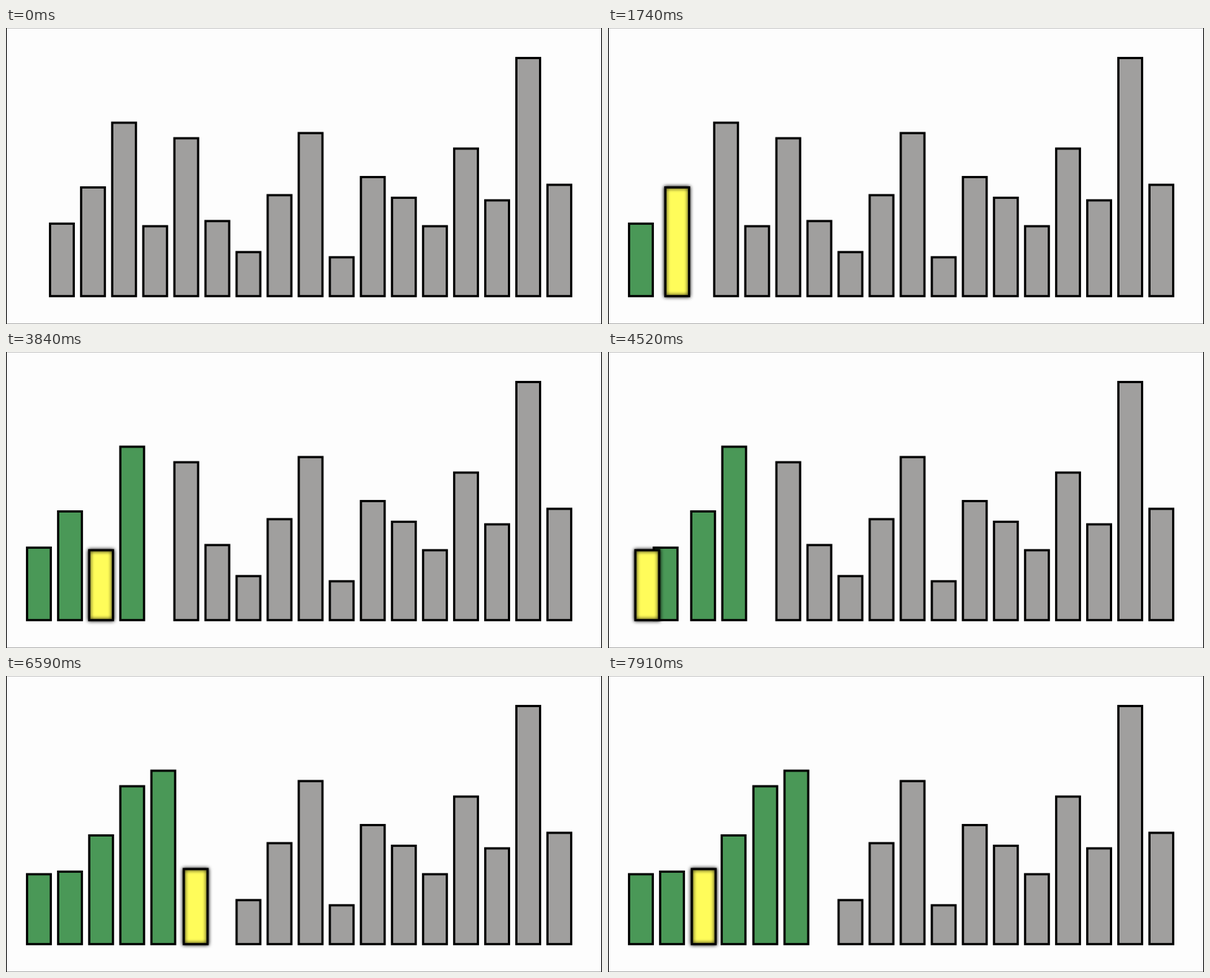
An HTML page with a canvas for the animation above (8000 ms loop, 804 by 400 pixels).

```html
<!DOCTYPE html>
<html lang="en">
<head>
<meta charset="utf-8">
<title>Insertion sort</title>
<style>
  html, body { margin: 0; width: 100%; height: 100%; overflow: hidden; }
  canvas { display: block; }
</style>
</head>
<body>
<canvas id="stage" width="804" height="400"></canvas>
<script>
const ctx = document.getElementById('stage').getContext('2d');
const LOOP = 8000, DECAY = 95;
const PITCH = 41.94, BAR = 32, LINE = 3, BASE = 362.3, SCALE = 3.497;
const UNSORTED = 59.4, SORTED = 28.4;
const GREY = '#a09f9e', GREEN = '#4a9857', YELLOW = '#fffc5a', PAPER = '#fdfdfd';

const values = [28, 42, 67, 27, 61, 29, 17, 39, 63, 15, 46, 38, 27, 57, 37, 92, 43];

// Per picked bar: when it lights up, then when each of its slides starts.
const turns = [
  { lit: 830, slides: [1030] },
  { lit: 1400, slides: [1600] },
  { lit: 1980, slides: [2190] },
  { lit: 2650, slides: [2850, 3270, 3870, 4370] },
  { lit: 4870, slides: [5070, 5480] },
  { lit: 6110, slides: [6320, 6690, 7115, 7540] }
];

const bars = values.map((value, i) => ({
  value,
  home: UNSORTED + i * PITCH,
  moves: [],
  lit: i < turns.length ? turns[i].lit : Infinity,
  done: i + 1 < turns.length ? turns[i + 1].lit : Infinity
}));

function plan() {
  const order = [];
  const send = (bar, slot, start) => bar.moves.push({ start, x: SORTED + slot * PITCH });
  turns.forEach(({ slides }, i) => {
    const bar = bars[i];
    let slot = i;
    order.push(bar);
    send(bar, slot, slides[0]);
    for (let n = 1; slot > 0 && order[slot - 1].value > bar.value; n++, slot--) {
      const other = order[slot - 1];
      order[slot] = other;
      order[slot - 1] = bar;
      send(other, slot, slides[n]);
      send(bar, slot - 1, slides[n]);
    }
  });
}

function position(bar, t) {
  let x = bar.home;
  for (let i = 0; i < bar.moves.length; i++) {
    const move = bar.moves[i], next = bar.moves[i + 1];
    if (t < move.start) break;
    if (next && t >= next.start) { x = move.x; continue; }
    const left = (x - move.x) * Math.exp((move.start - t) / DECAY);
    x = move.x + (Math.abs(left) < 0.4 ? 0 : left);
  }
  return x;
}

function drawBar(bar, t, color, glow) {
  const h = bar.value * SCALE;
  const box = [position(bar, t), BASE - h, BAR, h];
  ctx.shadowColor = '#000';
  ctx.shadowBlur = glow ? 5 : 0;
  ctx.fillStyle = color;
  ctx.fillRect(...box);
  ctx.strokeStyle = '#000';
  ctx.lineWidth = LINE;
  ctx.strokeRect(...box);
  ctx.shadowBlur = 0;
}

function drawPaper() {
  ctx.fillStyle = PAPER;
  ctx.fillRect(0, 0, 804, 400);
  ctx.fillStyle = '#ccc';
  ctx.fillRect(0, 0, 804, 1);
  ctx.fillStyle = '#b4b4b4';
  ctx.fillRect(0, 399, 804, 1);
  ctx.fillStyle = '#000';
  ctx.fillRect(0, 0, 1, 400);
  ctx.fillRect(803, 0, 1, 400);
}

function draw(t) {
  drawPaper();
  let picked = null;
  for (const bar of bars) {
    if (t >= bar.lit && t < bar.done) picked = bar;
    else drawBar(bar, t, t >= bar.done ? GREEN : GREY, false);
  }
  if (picked) drawBar(picked, t, YELLOW, true);
}

plan();
const began = performance.now();
function tick() {
  draw((performance.now() - began) % LOOP);
  requestAnimationFrame(tick);
}
tick();
</script>
</body>
</html>
```
